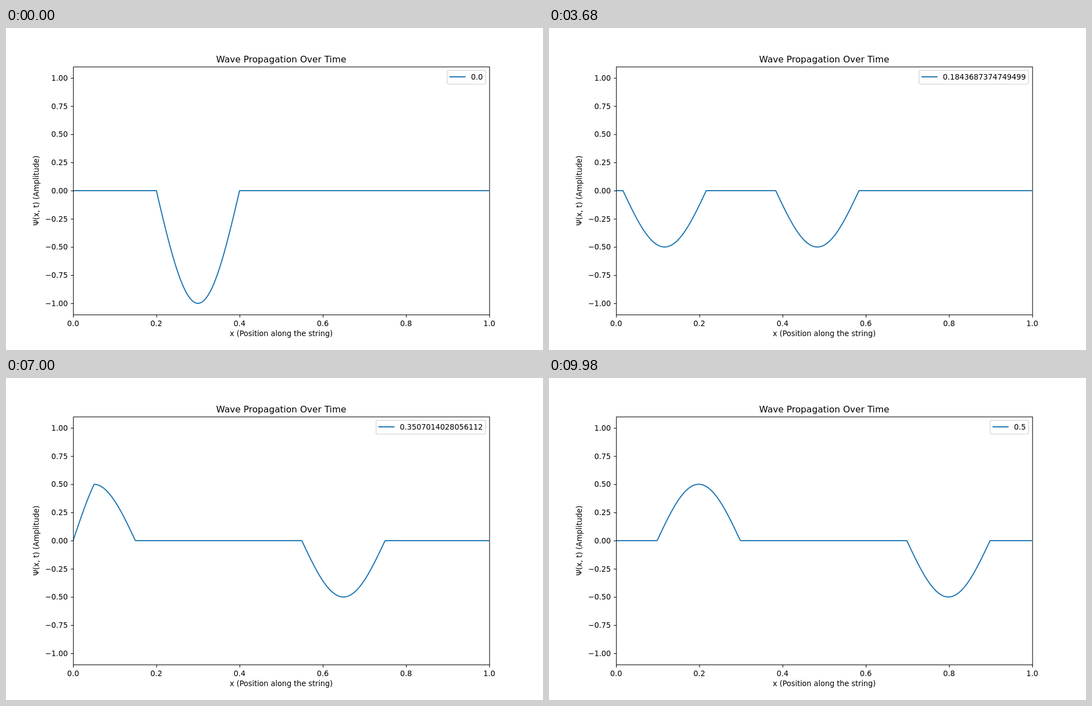
Recreate the animation shown at these times as an HTML page with a canvas. Size 966x580 px, loop 10000 ms.

```html
<!DOCTYPE html>
<html lang="en">
<head>
<meta charset="utf-8">
<title>Wave Propagation Over Time</title>
<style>
html, body { margin: 0; width: 100%; height: 100%; overflow: hidden; background: #fff; }
canvas { display: block; }
</style>
</head>
<body>
<canvas id="plot" width="966" height="580"></canvas>
<script>
const ctx = document.getElementById('plot').getContext('2d');
const STEPS = 500, STEP_MS = 20, T_MAX = 0.5;
const GRID = 1000, DX = 1 / GRID;

// The figure is laid out on 1000 x 600 units at 100 dpi.
const PT = 100 / 72, EM = 10 * PT;
const LEFT = 125, RIGHT = 900, TOP = 72, BOTTOM = 534;
const BLUE = '#1f77b4';
const px = x => LEFT + (RIGHT - LEFT) * x;
const py = y => (TOP + BOTTOM) / 2 - y * (BOTTOM - TOP) / 2.2;

function font(size) {
  ctx.font = `${size * PT}px "DejaVu Sans", sans-serif`;
}

function text(str, x, y, align = 'center', size = 10) {
  font(size);
  ctx.fillStyle = '#000';
  ctx.textAlign = align;
  ctx.fillText(str, x, y);
}

function line(x1, y1, x2, y2) {
  ctx.beginPath();
  ctx.moveTo(x1, y1);
  ctx.lineTo(x2, y2);
  ctx.stroke();
}

function pen(color, points) {
  ctx.strokeStyle = color;
  ctx.lineWidth = points * PT;
}

// Initial half-sine dip, extended oddly across the fixed end at x = 0.
function pulse(x) {
  if (x < 0) return -pulse(-x);
  return x > 0.2 && x < 0.4 ? -Math.sin(Math.PI * (x - 0.2) / 0.2) : 0;
}

function drawWave(step) {
  const shift = step ? (step - 0.5) * DX : 0;
  const psi = x => (pulse(x + shift) + pulse(x - shift)) / 2;
  ctx.save();
  ctx.beginPath();
  ctx.rect(LEFT, TOP, RIGHT - LEFT, BOTTOM - TOP);
  ctx.clip();
  pen(BLUE, 1.5);
  ctx.lineJoin = 'round';
  ctx.beginPath();
  for (let j = 0; j <= GRID; j++) ctx.lineTo(px(j * DX), py(psi(j * DX)));
  ctx.stroke();
  ctx.restore();
}

function drawAxes() {
  const tick = 3.5 * PT;
  pen('#000', 0.8);
  for (let k = 0; k <= 5; k++) {
    const x = px(k / 5);
    line(x + 0.5, BOTTOM + 0.5, x + 0.5, BOTTOM + 0.5 + tick);
    text((k / 5).toFixed(1), x, 555);
  }
  for (let k = -4; k <= 4; k++) {
    const y = py(k / 4);
    line(LEFT + 0.5, y + 0.5, LEFT + 0.5 - tick, y + 0.5);
    text((k < 0 ? '\u2212' : '') + Math.abs(k / 4).toFixed(2), LEFT - 7 * PT, y + 5.2, 'right');
  }
  ctx.strokeRect(LEFT + 0.5, TOP + 0.5, RIGHT - LEFT, BOTTOM - TOP);

  text('Wave Propagation Over Time', (LEFT + RIGHT) / 2, 64, 'center', 12);
  text('x (Position along the string)', (LEFT + RIGHT) / 2, 573.8);
  ctx.save();
  ctx.translate(61, (TOP + BOTTOM) / 2);
  ctx.rotate(-Math.PI / 2);
  text('\u03a8(x, t) (Amplitude)', 0, 0);
  ctx.restore();
}

function drawLegend(label) {
  font(10);
  const right = RIGHT - 0.5 * EM, top = TOP + 0.5 * EM;
  const textX = right - 0.4 * EM - ctx.measureText(label).width + 0.5;
  const handleX = textX - 2.8 * EM;
  const left = handleX - 0.4 * EM;
  ctx.beginPath();
  ctx.roundRect(left, top, right - left, 25.6, 0.2 * EM);
  ctx.fillStyle = 'rgba(255,255,255,0.8)';
  ctx.fill();
  pen('rgba(204,204,204,0.8)', 1);
  ctx.stroke();
  pen(BLUE, 1.5);
  ctx.lineCap = 'square';
  line(handleX, 91, handleX + 2 * EM, 91);
  ctx.lineCap = 'butt';
  text(label, textX, 96, 'left');
}

function timeLabel(step) {
  if (step === 0) return '0.0';
  return String(step === STEPS - 1 ? T_MAX : step * (T_MAX / (STEPS - 1)));
}

function draw(ms) {
  const step = Math.floor(ms / STEP_MS) % STEPS;
  ctx.setTransform(1, 0, 0, 1, 0, 0);
  ctx.fillStyle = '#fff';
  ctx.fillRect(0, 0, 966, 580);
  ctx.scale(966 / 1000, 580 / 600);
  drawWave(step);
  drawAxes();
  drawLegend(timeLabel(step));
}

let start;
function loop(now) {
  start ??= now;
  draw(Math.max(0, now - start));
  requestAnimationFrame(loop);
}
draw(0);
requestAnimationFrame(loop);
</script>
</body>
</html>
```
